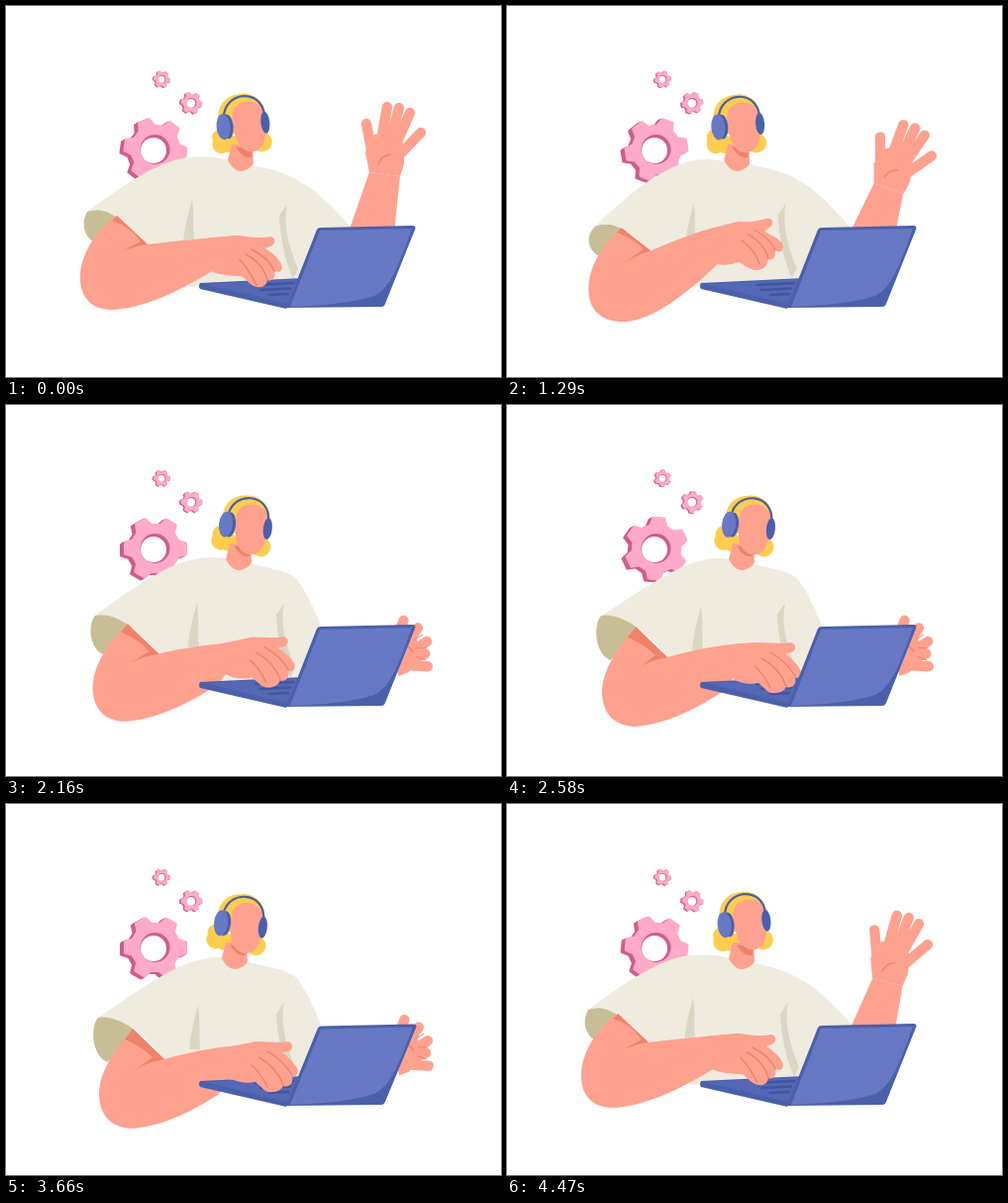
Animation of 500x375 px, one loop 4500 ms. Source, as an HTML page:

```html
<!DOCTYPE html>
<html lang="en">
<head>
<meta charset="utf-8">
<title>Support agent at a laptop</title>
<style>
html, body { margin: 0; width: 100%; height: 100%; overflow: hidden; background: #fff; }
svg { display: block; width: 100vw; height: 100vh; }
</style>
</head>
<body>
<svg id="stage" viewBox="0 0 500 375"></svg>
<script>
const LOOP = 4500, STEP = 30;
const SKIN = '#ffa18f', SHADE = '#ee836a', SHIRT = '#efebdf', FOLD = '#d9d7c4', KHAKI = '#c7be95';
const HAIR = '#ffcd4d', BLUE = '#6779c4', NAVY = '#4a60ab', PINK = '#ffaac8', ROSE = '#d05c8c';

const stage = document.getElementById('stage');
function el(tag, attrs, parent = stage) {
  const node = document.createElementNS('http://www.w3.org/2000/svg', tag);
  for (const k in attrs) node.setAttribute(k, attrs[k]);
  return parent.appendChild(node);
}
const shape = (fill, d = '', parent) => el('path', { fill, d }, parent);
const line = (stroke, width, d = '', parent) => el('path', {
  fill: 'none', stroke, 'stroke-width': width, 'stroke-linecap': 'round', 'stroke-linejoin': 'round', d
}, parent);
const draw = (node, d) => node.setAttribute('d', d);
const place = (node, x, y, turn = 0) => node.setAttribute('transform', `translate(${x} ${y}) rotate(${turn})`);

// Path blending: all variants of a path share one command layout.
const NUM = /-?\d+(\.\d+)?/g;
const nums = d => d.match(NUM).map(Number);
function fill(layout, values) {
  let i = 0;
  return layout.replace(NUM, () => values[i++].toFixed(2));
}
function blend(paths, weights) {
  const all = paths.map(nums);
  return all[0].map((v, i) => weights.reduce((s, w, k) => s + w * (all[k + 1][i] - v), v));
}
const mix = (a, b, w) => fill(a, blend([a, b], [w]));
const shift = (v, dx, dy, from = 0) => v.map((n, i) => i < from ? n : n + (i % 2 ? dy : dx));

// Looping monotone cubic track; each row is [time, ...values].
function track(rows, t) {
  const n = rows.length;
  const time = i => rows[(i + n) % n][0] + Math.floor(i / n) * LOOP;
  const val = (i, j) => rows[(i + n) % n][j];
  const slope = (i, j) => (val(i + 1, j) - val(i, j)) / (time(i + 1) - time(i));
  const tangent = (i, j) => {
    const a = slope(i - 1, j), b = slope(i, j);
    return a * b <= 0 ? 0 : 2 * a * b / (a + b);
  };
  let i = n - 1;
  while (rows[i][0] > t) i--;
  const h = time(i + 1) - time(i), u = (t - time(i)) / h, v = 1 - u;
  return rows[0].slice(1).map((_, k) => {
    const j = k + 1;
    return v * v * (1 + 2 * u) * val(i, j) + u * u * (3 - 2 * u) * val(i + 1, j)
      + h * u * v * (v * tangent(i, j) - u * tangent(i + 1, j));
  });
}

// Poses: resting, lifted, typing; the front hand adds pointing.
const SLEEVE = [
  'M224 156C215 152 195 152 183 153C150 158 115 184 82 208C98 203 110 208 143 242',
  'M219 158C205 154 195 156 186 158C150 168 115 202 92 227C105 222 120 226 146 249',
  'M224 156C215 153 200 156 190 159C160 168 125 195 95 213C112 210 140 225 162 256'
];
const CUFF = [
  'M82 208C76 218 78 232 88 238L114 222L113 212C100 205 90 205 82 208Z',
  'M92 227C80 236 82 250 95 258L118 240L118 229C108 224 100 224 92 227Z',
  'M95 213C87 222 88 250 104 258L130 236L131 225C118 212 105 210 95 213Z'
];
const ARM = [
  'M112 212C95 222 76 248 75 272C74 298 90 308 110 307C145 304 180 285 208 268L235 232C205 234 170 238 143 241Z',
  'M117 228C98 246 85 268 85 290C85 315 103 323 122 323C155 320 185 288 213 260L235 217C205 217 182 232 146 249Z',
  'M130 224C112 245 96 268 96 291C97 317 114 325 130 325C165 322 195 304 216 291L258 240C235 240 195 245 162 255Z'
];
const CREASE = [
  'M112 212L107 217C120 221 129 228 136 238L115 249C124 245 133 242 143 241Z',
  'M117 228L112 233C122 236 132 242 139 248L118 264C128 257 138 252 146 249Z',
  'M130 224L122 235C132 239 142 245 150 253L134 265C143 259 152 257 162 255Z'
];
const HAND_REST = 'M205 236L235 232C248 234 260 235 266 233C273 233 273 241 267 243L262 245C270 250 279 258 279 265C278 270 274 269 271 268C273 275 268 279 264 277C263 284 256 287 247 281L238 273C228 273 215 272 207 268Z';
const HAND_LIFT = 'M212 220L235 217C248 219 258 215 264 214C270 214 272 219 265 224L261 227C270 232 280 236 280 243C279 249 275 248 272 246C273 254 269 257 265 255C265 263 256 270 245 264L235 258C225 262 215 262 209 258Z';
const HAND_TYPE = 'M225 243L255 240C268 240 280 242 286 240C292 241 293 247 288 250L281 251C287 256 296 264 297 270C296 276 293 276 291 275C293 283 287 287 282 285C280 290 271 293 264 290L254 281C245 283 235 281 228 277Z';
const HAND_POINT = 'M205 238L235 233C248 233 258 230 265 230C271 231 271 236 266 238L268 239C278 243 286 246 285 251C283 256 276 254 268 251C275 264 271 271 264 269C265 277 257 280 249 274L238 270C228 274 215 272 207 268Z';
const KNUCKLES = [
  'M248 246C260 252 267 258 271 268M242 251C254 257 261 266 264 277M236 256C243 264 248 272 253 282',
  'M252 226C262 232 269 238 272 246M245 230C255 236 262 243 265 254M238 236C247 243 253 249 256 260',
  'M266 250C277 256 285 264 291 274M257 256C269 262 277 271 282 284M250 264C257 269 261 276 266 286',
  'M240 240C252 244 260 248 268 251M246 250C256 255 262 260 265 268M240 257C247 261 253 268 256 275'
];

// time, lifted, typing, dx, dy
const BODY_KEYS = [
  [0, 0, 0, 0, 0], [600, 1, 0, 0, 1], [750, 1, 0, 0, 0], [1110, .85, 0, 0, 0], [1590, .5, 0, -1, 1],
  [1770, 0, 0, -4, 4], [2160, 0, .6, 0, 2], [2400, 0, 1, 0, 2], [2580, 0, 1, 0, 0], [3090, 0, 0, 1, 5],
  [3250, 0, 0, -3, 5], [3560, 0, 1, -2, 5], [3660, 0, 1, -2, 3], [4320, 0, 0, -1, 1], [4470, 0, 0, 0, 0]
];
// time, lifted, typing, pointing, dx, dy
const HAND_KEYS = [
  [0, 0, 0, 0, 0, 0], [600, 1, 0, 0, 0, 1], [750, 1, 0, 0, 0, 0], [1110, 1, 0, 0, 0, 0],
  [1770, 1, 0, 0, -6, 4], [2160, .2, .7, 0, 0, 0], [2400, 0, 1, 0, 0, 2], [2580, 0, 1, 0, 0, 0],
  [3090, 0, 0, 1, 0, 0], [3250, 0, 0, 1, -1, 0], [3560, 0, 1, 0, -2, 2], [3660, 0, 1, 0, -2, 0],
  [4320, 0, 0, 0, 0, 0], [4470, 0, 0, 0, 0, 0]
];
// time, x, y, tilt, neck x
const HEAD_KEYS = [
  [0, 241, 120, -6, 0], [750, 233.5, 120.5, -6, -5.5], [1160, 234, 120.5, -6, -5], [1770, 240, 122.5, 6, -4],
  [2580, 245.5, 123, 6, 0], [3090, 240.5, 122.5, 6, -4], [3660, 238.5, 122.5, 6, -6], [4350, 241, 120, -6, 0]
];
// time, wrist x, wrist y, turn, elbow x, grip
const WAVE_KEYS = [
  [0, 382, 168, 0, 369, 0], [170, 371, 159, -15, 364, 0], [460, 381, 167, 0, 369, 0],
  [750, 373, 160, -14, 365, 0], [1040, 382, 168, 0, 369, 0], [1160, 382, 169, 1, 369, 0],
  [1420, 390, 205, 30, 366, .2], [1650, 394, 248, 64, 350, .9], [1770, 392, 250, 70, 345, 1],
  [4050, 392, 250, 70, 345, 1], [4290, 395, 212, 36, 362, .15], [4470, 384, 178, 6, 368, 0]
];
const LID_KEYS = [[0, 0], [2850, 0], [3280, 1], [3750, 0]];

// Gears
const toothed = (() => {
  const pts = [];
  for (let k = 0; k < 6; k++) {
    for (const [r, off] of [[24, -19], [31, -10], [31, 10], [24, 19]]) {
      const a = (k * 60 + off) * Math.PI / 180;
      pts.push((r * Math.cos(a)).toFixed(2) + ' ' + (r * Math.sin(a)).toFixed(2));
    }
  }
  return 'M' + pts.join('L') + 'Z';
})();
const wheels = [];
for (const [x, y, s] of [[151, 145, 1], [187.5, 98, .34], [157.5, 74, .265]]) {
  const g = el('g', { transform: `translate(${x} ${y}) scale(${s})` });
  for (let i = 4; i >= 0; i--) {
    const c = i ? ROSE : PINK;
    const node = el('path', { d: toothed, fill: c, stroke: c, 'stroke-width': 3, 'stroke-linejoin': 'round' }, g);
    wheels.push([node, -i, i / 2]);
  }
  el('circle', { cx: -.5, cy: 0, r: 15, fill: ROSE }, g);
  el('circle', { cx: -2, cy: 1, r: 13, fill: '#fff' }, g);
}

// Layers, back to front
const cuff = shape(KHAKI), shirt = shape(SHIRT);
const foldL = shape(FOLD, 'M188 195C183 215 180 225 179 240L190 240C189 222 190 208 188 195Z');
const foldR = shape(FOLD, 'M284 200L276 212C277 235 282 258 290 276L295 266C285 240 280 222 284 200Z');

const buns = el('g', {});
for (const [cx, cy, r] of [[-26, 10, 8], [-25, 17, 9.5], [-16, 18, 9], [16, 19, 10]]) {
  el('circle', { cx, cy, r, fill: HAIR }, buns);
}
const neck = el('g', {});
shape(SKIN, 'M228 140L224 156C228 164 233 167 238 167C244 166 249 162 250 159L249 140Z', neck);
shape(SHADE, 'M232 142C236 150 242 154 248 153L249 145Z', neck);

const head = el('g', {});
shape(HAIR, 'M-25 -4C-28 -18 -18 -31 -4 -31C8 -34 25 -24 22 -2L14 8L-20 8Z', head);
shape(SKIN, 'M-12 -5C-12 -18 -5 -23 4 -23C15 -23 21 -15 21 -4C21 9 20 27 6 28C-6 28 -12 15 -12 -5Z', head);
line(NAVY, 2.2, 'M-20 -10C-17 -35 20 -36 21 -8', head);
const cup = (fill, cx, rx, ry) => el('ellipse', { cx, cy: 0, rx, ry, fill }, head);
cup(NAVY, 21, 4.5, 11);
cup(NAVY, -17.5, 6, 12.5);
cup(BLUE, -21.5, 7, 13);

const forearm = shape(SKIN), wave = el('g', {});
const palm = shape(SKIN, '', wave), fingers = line(SKIN, 10.3, '', wave);
const gaps = line(SHADE, 1, 'M-13 -18L-20 -25M-5 -24L-7 -33M4 -24L7 -32M12 -20L18 -27', wave);
line(SHADE, 1.3, 'M-6 -8C-4 -14 0 -17 6 -18', wave);

const arm = shape(SKIN), crease = shape(SHADE);
shape(NAVY, 'M196 280L300 275L283 306L196 286Q194 283 196 280Z');
shape('#5568b5', 'M200 281L298 276L284 301Z');
line('#43559f', 2.4, 'M252 282L290 280M257 287L287 285.500M266 292L285 291');
const hand = shape(SKIN), knuckles = line(SHADE, 1.4);
const lid = shape(NAVY), panel = shape(BLUE);

const LID = [
  'M283 305L314 226Q315 224 318 224L410 222Q415 222 413 226L383 301Q382 304 379 304Z',
  'M283 305L324 232Q325 230 328 230L420 228Q425 228 423 232L383 301Q382 304 379 304Z'
];
const PANEL = [
  'M287 304L317 227L410 225C396 264 388 285 372 293C350 300 320 303 287 304Z',
  'M287 304L327 233L419 231C402 266 390 286 372 293C350 300 320 303 287 304Z'
];
const SIDE = [
  'L185 284L292 277L325 245L322 232C312 208 300 180 290 173C280 167 262 164 250 161Z',
  'L185 284L292 277L325 245L348 223C331 204 311 184 297 178C285 169 265 164 250 161Z'
];
const PALM = [
  'M-15 0L-19 -20L-10 -38L9 -41L20 -28L20 -8L16 4Z',
  'M-15 0L-21 -14L-10 -25L6 -27L17 -22L24 -6L24 4Z'
];
const FINGERS = [
  'M-12 -18L-18 -49M-3 -32L3 -66M6 -32L15 -65M12 -28L26 -60M14 -16L37 -40',
  'M-12 -7L-27 -20M-3 -14L-15 -31M6 -14L1 -35M12 -12L12 -29M16 -6L25 -27'
];
const HANDS = [HAND_REST, HAND_LIFT, HAND_TYPE, HAND_POINT];

function render(t) {
  for (const [node, x, y] of wheels) place(node, x, y, 8 + 360 * t / LOOP);

  const [lift, type, dx, dy] = track(BODY_KEYS, t), w = [lift, type];
  const [wx, wy, turn, ex, grip] = track(WAVE_KEYS, t);
  const [open] = track(LID_KEYS, t);
  const body = paths => shift(blend(paths, w), dx, dy);

  draw(cuff, fill(CUFF[0], body(CUFF)));
  const side = blend(SIDE, [1 - grip]);
  side[6] += Math.min(0, turn) * .35 * (1 - grip);
  draw(shirt, fill(SLEEVE[0], shift(blend(SLEEVE, w), dx, dy, 12)) + fill(SIDE[0], side));
  place(foldL, dx + lift + 8 * type, 6 * lift + 8 * type);
  place(foldR, -3 * Math.max(grip, lift), -lift);

  const armAt = body(ARM);
  draw(arm, fill(ARM[0], armAt));
  draw(crease, fill(CREASE[0], body(CREASE)));

  const [hl, ht, hp, hx, hy] = track(HAND_KEYS, t), hw = [hl, ht, hp];
  const handAt = shift(blend(HANDS, hw), hx, hy);
  // keep the wrist on the upper edge of the forearm
  for (const k of [0, 1]) {
    handAt[k] = .3 * armAt[20 + k] + .44 * armAt[22 + k] + .22 * armAt[24 + k] + .04 * armAt[26 + k];
  }
  draw(hand, fill(HAND_REST, handAt));
  draw(knuckles, fill(KNUCKLES[0], shift(blend(KNUCKLES, hw), hx, hy)));

  const [x, y, tilt, nx] = track(HEAD_KEYS, t);
  place(buns, x, y, tilt);
  place(head, x, y, tilt);
  place(neck, nx, 0);

  const px = wx + 9 * open, py = wy + 3 * open, a = turn * Math.PI / 180, c = Math.cos(a), s = Math.sin(a);
  place(wave, px, py, turn);
  draw(palm, mix(...PALM, grip));
  draw(fingers, mix(...FINGERS, grip));
  gaps.setAttribute('opacity', Math.max(0, grip * 2 - 1));
  draw(forearm, `M${px - 15 * c} ${py - 15 * s}L${px + 16 * c - 4 * s} ${py + 16 * s + 4 * c}L${ex + 22} 240L${ex - 27} 240Z`);

  draw(lid, mix(...LID, open));
  draw(panel, mix(...PANEL, open));
}

const start = performance.now();
function tick() {
  const t = (performance.now() - start) % LOOP;
  render(Math.floor(t / STEP) * STEP);
  requestAnimationFrame(tick);
}
tick();
</script>
</body>
</html>
```
